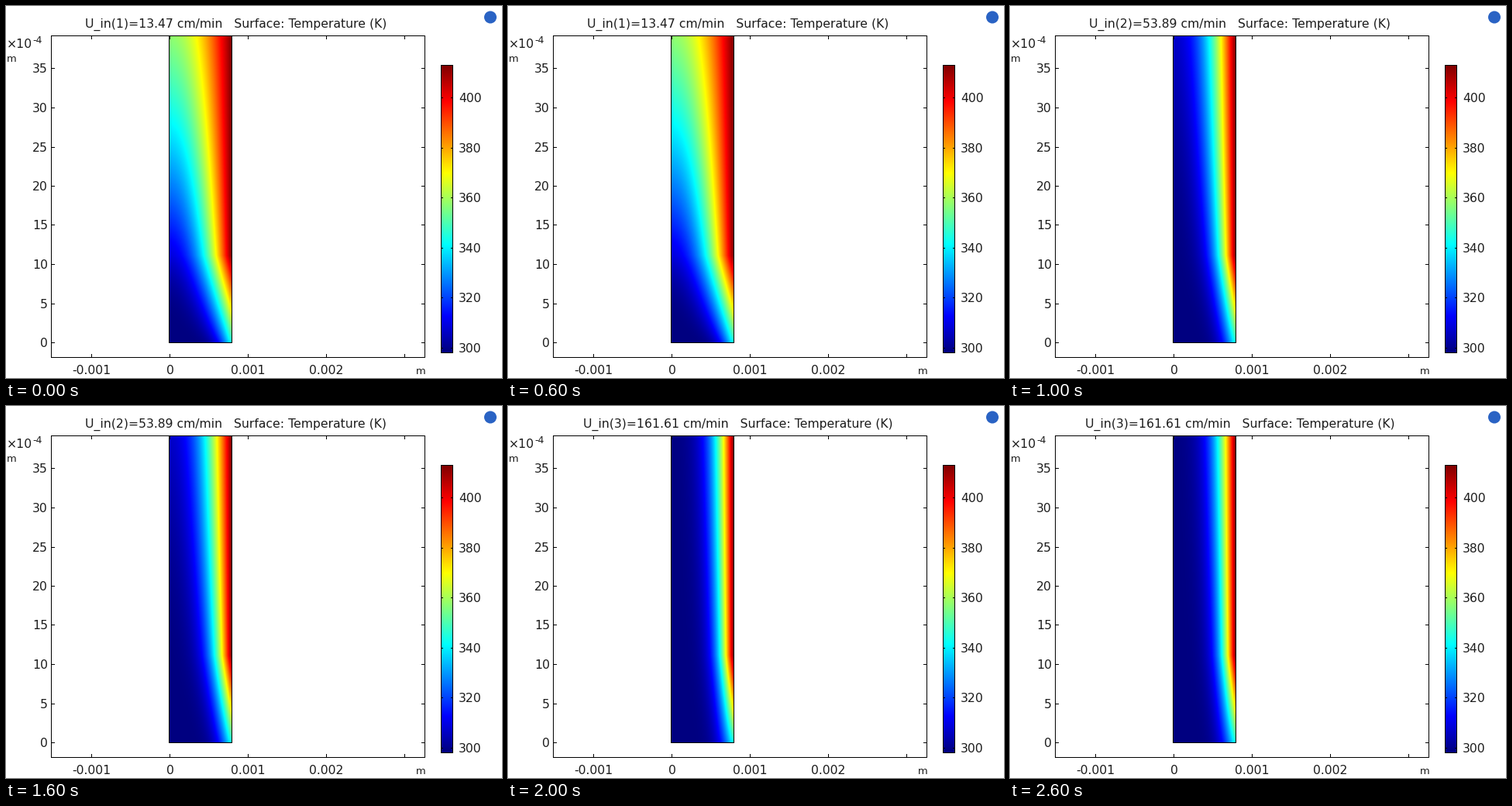
These frames come from a looping animation (640 by 480 pixels, 3000 ms). A matplotlib script:

```python
import numpy as np
import matplotlib.pyplot as plt
from matplotlib.animation import FuncAnimation
from matplotlib.colors import LinearSegmentedColormap
from matplotlib.patches import Circle, Rectangle

W, H, DPI = 640, 480, 100
PX = 72 / DPI
T_IN, T_WALL = 298, 413
SPEEDS = [13.47, 53.89, 161.61]
X0, X1, Y0, Y1 = 211, 291, 39, 434  # the heated channel
RAINBOW = LinearSegmentedColormap.from_list("rainbow", [
    (0, "#000080"), (.125, "blue"), (.375, "cyan"),
    (.625, "yellow"), (.875, "red"), (1, "#800000")], N=512)

plt.rcParams["font.family"] = "DejaVu Sans"
fig = plt.figure(figsize=(W / DPI, H / DPI), dpi=DPI, facecolor="white")
ax = fig.add_axes([0, 0, 1, 1])
ax.axis("off")


# Integer coordinates name the pixel that a line covers.
def line(x0, y0, x1, y1):
    ax.plot([x0, x1], [y0, y1], color="black", lw=PX, antialiased=False,
            solid_capstyle="projecting", snap=True, zorder=3)


def box(x0, y0, x1, y1):
    ax.add_patch(Rectangle((x0, y0), x1 - x0, y1 - y0, fill=False, ec="black",
                           lw=PX, antialiased=False, snap=True, zorder=3))


def label(x, y, s, ha="center", size=15.6):
    return ax.text(x, y, s, ha=ha, va="baseline", fontsize=size * PX,
                   color="#1c1c1c")


def picture(data, x0, y0, x1, y1):
    return ax.imshow(data, extent=(x0, x1, y1, y0), cmap=RAINBOW, vmin=T_IN,
                     vmax=T_WALL, aspect="auto", interpolation="nearest", zorder=1)


def temperature(speed):
    """Heat diffusing from the right wall into a stream that rises at speed."""
    x = (np.arange(X0, X1) + .5 - X0) / (X1 - X0)
    z = ((Y1 - np.arange(Y0, Y1) - .5) / (Y1 - Y0))[:, None]
    time = .0225 + .37 * z * SPEEDS[0] / speed
    heat = 1
    for n in range(12):
        k = (n + .5) * np.pi
        heat = heat - 2 * (-1) ** n / k * np.cos(k * x) * np.exp(-k * k * time)
    wall = np.minimum(1, .41 + 2.08 * z)
    return T_IN + (T_WALL - T_IN) * wall * heat


FIELDS = [temperature(speed) for speed in SPEEDS]
surface = picture(FIELDS[0], X0, Y0, X1, Y1)
box(X0 - 1, Y0 - 1, X1, Y1)

# Plot frame with inward ticks on all sides
box(58, 38, 540, 453)
for i, name in enumerate(["-0.001", "0", "0.001", "0.002", ""]):
    x = 110 + 101 * i
    line(x, 449, x, 453)
    line(x, 38, x, 42)
    label(x + .7, 475, name)
for i in range(8):
    y = round(434 - 50.5 * i)
    line(58, y, 62, y)
    line(536, y, 540, y)
    label(54, y + 6, str(5 * i), "right")

label(.5, 54, "×10", "left")
label(34, 48, "-4", "left", 12.5)
label(1, 72, "m", "left", 13)
label(529, 475, "m", "left", 13)

# Colour scale
picture(np.linspace(T_WALL, T_IN, 371)[:, None], 561, 76, 577, 447)
box(561, 76, 576, 447)
for i in range(6):
    y = round(441 - 64.6 * i)
    line(561, y, 563, y)
    line(574, y, 576, y)
    label(584, y + 6, str(300 + 20 * i), "left")

ax.add_patch(Circle((625, 14.5), 8, color="#2a63c4", lw=0))
title = label(296.5, 28, "")
ax.set_xlim(0, W)
ax.set_ylim(H, 0)


def draw(i):
    surface.set_data(FIELDS[i])
    title.set_text(f"U_in({i + 1})={SPEEDS[i]:.2f} cm/min   Surface: Temperature (K)")
    return surface, title


anim = FuncAnimation(fig, draw, frames=len(SPEEDS), interval=1000, repeat=True)
plt.show()
```
